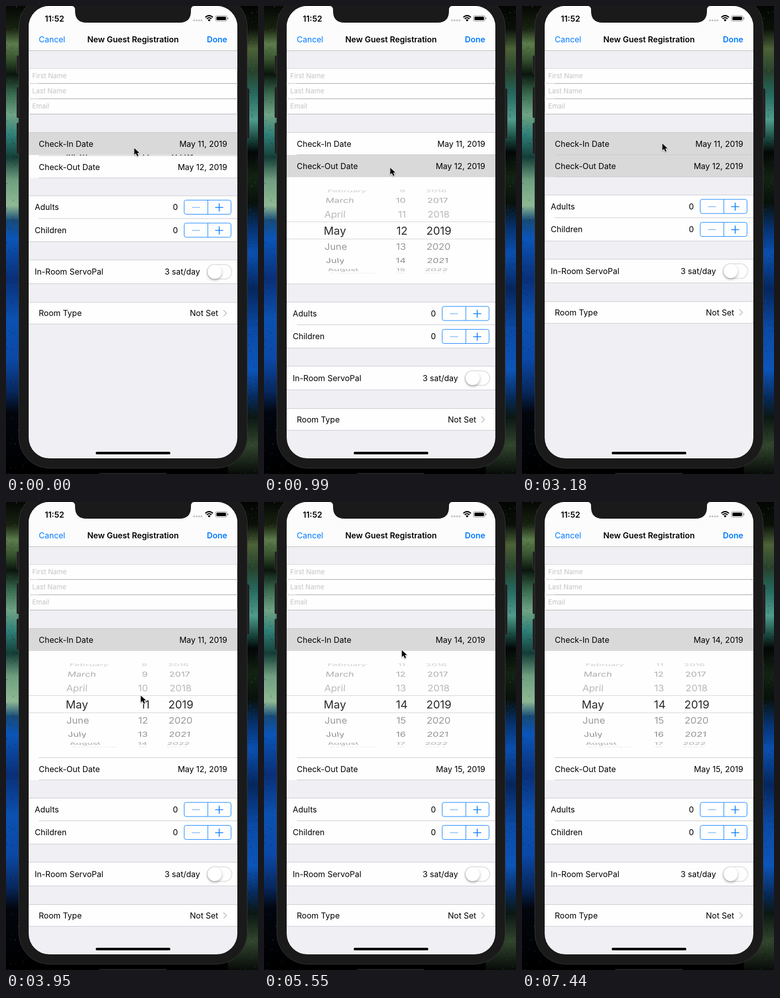
An HTML page with a canvas that plays this animation: 500x927 px, repeating every 7750 ms.

```html
<!DOCTYPE html>
<html lang="en">
<head>
<meta charset="utf-8">
<title>New Guest Registration</title>
<style>
html, body { margin: 0; width: 100%; height: 100%; overflow: hidden; background: #000; }
canvas { display: block; width: 500px; height: 927px; }
</style>
</head>
<body>
<canvas></canvas>
<script>
const W = 500, H = 927, LOOP = 7750;
const BLUE = '#007aff', LINE = '#c8c7cc', OPEN = 212;
const dpr = window.devicePixelRatio || 1;
const canvas = document.querySelector('canvas');
const makeContext = c => {
  c.width = W * dpr;
  c.height = H * dpr;
  const context = c.getContext('2d');
  context.scale(dpr, dpr);
  return context;
};
const screen = makeContext(canvas);
let g = screen;

// Drawing helpers
function rect(x, y, w, h, color) {
  g.fillStyle = color;
  g.fillRect(x, y, w, h);
}
function round(x, y, w, h, r, fill, stroke, width = 1) {
  g.beginPath();
  g.roundRect(x, y, w, h, r);
  if (fill) { g.fillStyle = fill; g.fill(); }
  if (stroke) { g.strokeStyle = stroke; g.lineWidth = width; g.stroke(); }
}
function stroke(path, color, width) {
  g.strokeStyle = color;
  g.lineWidth = width;
  g.stroke(new Path2D(path));
}
function text(s, x, y, { align = 'left', size = 16, color = '#000', weight = 400 } = {}) {
  g.font = `${weight} ${size}px Inter, sans-serif`;
  g.textAlign = align;
  g.fillStyle = color;
  g.fillText(s, x, y + size * 0.364);
}
const rule = (y, x = 45, color = LINE) => rect(x, y, 459 - x, 1, color);

// Timing helpers
const part = (t, a, b) => Math.min(1, Math.max(0, (t - a) / (b - a)));
const ease = (t, a, b) => (1 - Math.cos(Math.PI * part(t, a, b))) / 2;

const cursorPath = [
  [60, 254, 281], [150, 250, 318], [630, 250, 318], [990, 250, 320], [1460, 250, 320],
  [1800, 262, 420], [2000, 268, 405], [2230, 273, 345], [2450, 277, 310], [2690, 277, 310],
  [3040, 278, 272], [3400, 278, 272], [3950, 267, 383], [4010, 267, 383], [4480, 273, 293],
  [5500, 273, 293], [5550, 273, 293], [5790, 272, 294], [5970, 272, 294],
  [6740, 356, 615], [7440, 502, 930]
];
function cursorAt(t) {
  const i = cursorPath.findIndex(p => p[0] > t);
  if (i === 0) return cursorPath[0].slice(1);
  if (i < 0) return cursorPath.at(-1).slice(1);
  const [a, x0, y0] = cursorPath[i - 1], [b, x1, y1] = cursorPath[i];
  const e = ease(t, a, b);
  return [x0 + (x1 - x0) * e, y0 + (y1 - y0) * e];
}

// Wallpaper strips and phone body, drawn once
function paintBackdrop() {
  let seed = 7;
  const rnd = () => (seed = seed * 16807 % 2147483647) / 2147483647;
  const strip = (x, w, stops) => {
    const grad = g.createLinearGradient(0, 0, 0, H);
    stops.forEach(([y, c]) => grad.addColorStop(y / H, c));
    rect(x, 0, w, H, grad);
  };
  rect(0, 0, W, H, '#000');
  strip(0, 90, [[0, '#050805'], [45, '#18220f'], [75, '#5d7c4b'], [105, '#36522f'], [135, '#0a150c'],
    [175, '#3a6b50'], [215, '#6fa384'], [255, '#2f7f78'], [300, '#143d37'], [345, '#6f9f80'],
    [395, '#8fb994'], [425, '#164a78'], [460, '#0b55b8'], [540, '#0a2f77'], [620, '#0b51b0'],
    [700, '#0b48a6'], [765, '#08265a'], [805, '#02060d'], [927, '#000']]);
  strip(440, 60, [[0, '#030503'], [45, '#0a1008'], [85, '#4c6238'], [130, '#27412c'], [175, '#27695f'],
    [225, '#4f9c8b'], [262, '#1a4a42'], [290, '#030605'], [340, '#132313'], [390, '#07100a'],
    [440, '#06326f'], [490, '#0a4fae'], [560, '#06265c'], [640, '#0b4aa5'], [720, '#0c55b9'],
    [775, '#072a5a'], [815, '#0b1712'], [870, '#31452d'], [927, '#070b08']]);
  for (let i = 0; i < 1500; i++) {
    const x = rnd() < 0.5 ? rnd() * 48 : 452 + rnd() * 48;
    const y = rnd() * H, size = 0.5 + rnd() * 1.3;
    const color = y > 420 && y < 830 ? '40,110,200' : '125,165,110';
    rect(x, y, size, size, rnd() < 0.5 ? 'rgba(0,0,0,.4)' : `rgba(${color},${rnd() * 0.5})`);
  }
  rect(60, 905, 380, 22, '#000');
  rect(185, 925, 133, 2, '#242424');

  for (const [y, h] of [[98, 36], [160, 61], [231, 61]]) round(21.5, y + 0.5, 8, h, 2, '#1d1d1d', '#343434');
  round(474.5, 163.5, 8, 99, 2, '#1d1d1d', '#343434');
  round(25.5, -20, 453, 935.5, 61, '#1a1a1a', '#363636');
  round(28, -18, 448, 931, 59, '#1a1a1a');
}

function paintBars() {
  rect(45, 0, 414, 88, '#fcfcfd');
  rule(88, 45, '#b9b9bc');
  text('11:52', 77, 25, { weight: 600 });
  text('Cancel', 65, 66, { color: BLUE });
  text('New Guest Registration', 252, 66, { align: 'center', weight: 600 });
  text('Done', 439, 66, { align: 'right', weight: 600, color: BLUE });
  for (let i = 0; i < 4; i++) round(371 + i * 5, 26.5, 4, 4, 2, '#c6c6c8');
  g.lineCap = 'butt';
  stroke('M395.5 22.5Q403 15.5 410.5 22.5M398.2 25.4Q403 20.8 407.8 25.4', '#000', 2.2);
  g.fillStyle = '#000';
  g.fill(new Path2D('M400.2 27.6Q403 25 405.8 27.6L403 30.8Z'));
  round(415.5, 19, 23, 11, 3, null, '#8a8a8a');
  round(417.5, 21, 19, 7, 1.5, '#000');
  round(439.5, 22.5, 1.8, 4, 1, '#8a8a8a');
  g.fillStyle = '#1a1a1a';
  g.fill(new Path2D('M130 0Q137 0 137 8V10Q137 33 160 33H344Q367 33 367 10V8Q367 0 374 0Z'));
}

function paintFields() {
  rect(45, 123, 414, 92, '#fefefe');
  rule(123);
  ['First Name', 'Last Name', 'Email'].forEach((name, i) => {
    const y = 123.5 + i * 30.3;
    round(45.5, y, 413, 29.6, 5, '#fefefe', '#d4d4d4');
    text(name, 52, y + 14.5, { size: 13.4, color: '#c4c4c8' });
    if (i) rule(Math.round(y) - 1, 65, '#b4b4b8');
  });
  rule(214);
}

const months = ['January', 'February', 'March', 'April', 'May', 'June', 'July', 'August', 'September'];
const above = ['#b9b9b9', '#b9b9b9', '#adadad', '#cecece', '#e4e4e4'];
const below = ['#999', '#999', '#8f8f8f', '#a8a8a8', '#dedede'];
function paintPicker(top, height, day) {
  const mid = 252, cy = top + height / 2, step = 0.394, radius = 84.6;
  const columns = [
    { x: 119, lensX: 118.5, align: 'left', pos: 4, label: i => months[i] },
    { x: 282, lensX: 285, align: 'right', pos: day, label: i => i },
    { x: 347, lensX: 347, align: 'center', pos: 2019, label: i => i }
  ];
  const clipped = (boxes, draw) => {
    g.save();
    g.beginPath();
    boxes.forEach(b => g.rect(45, b[0], 414, b[1]));
    g.clip();
    for (const c of columns) {
      const first = Math.round(c.pos) - 4;
      for (let i = first; i < first + 9; i++) draw(c, c.label(i), i - c.pos);
    }
    g.restore();
  };
  g.save();
  g.beginPath();
  g.rect(45, top, 414, height);
  g.clip();
  clipped([[cy - 82, 65], [cy + 17, 70]], (c, label, off) => {
    const a = off * step;
    if (Math.abs(a) > 1.65) return;
    const shrink = 1 - 0.085 * (1 - Math.cos(a));
    const shear = (mid - c.x) * 0.001 * Math.sin(a);
    const tone = Math.min(4, Math.round(Math.abs(off)));
    g.save();
    g.transform(shrink, 0, shear, Math.max(0.12, Math.cos(a)),
      mid + (c.x - mid) * shrink, cy + radius * Math.sin(a));
    text(label, 0, 0, { align: c.align, size: 19.4, color: (off < 0 ? above : below)[tone] });
    g.restore();
  });
  clipped([[cy - 17, 34]], (c, label, off) =>
    text(label, c.lensX, cy + off * 34, { align: c.align, size: 22, color: '#2a2a2a' }));
  rule(Math.round(cy - 17.5), 45, '#d2d2d4');
  rule(Math.round(cy + 16.5), 45, '#d2d2d4');
  g.restore();
}

function dateRow(y, label, value, glow) {
  rect(45, y, 414, 44, '#fefefe');
  rect(45, y, 414, 44, `rgba(217,217,217,${glow})`);
  text(label, 65, y + 22, {});
  text(value, 439, y + 22, { align: 'right' });
}

function stepperRow(y, label) {
  text(label, 57, y, {});
  text('0', 341, y, { align: 'right' });
  round(353.5, y - 14, 93, 28, 4, null, BLUE);
  stroke(`M400.5 ${y - 14}v28`, BLUE, 1);
  stroke(`M369 ${y + 0.5}h16`, 'rgba(0,122,255,.5)', 1.4);
  stroke(`M415 ${y + 0.5}h16M423 ${y - 7.5}v16`, BLUE, 1.6);
}

function section(y, h) {
  rect(45, y, 414, h, '#fefefe');
  rule(y);
  rule(y + h);
}

function paintLower(shift) {
  g.save();
  g.translate(0, Math.round(shift * 2) / 2);
  section(374, 91);
  rule(419, 65);
  stepperRow(397, 'Adults');
  stepperRow(442.5, 'Children');

  section(501, 47);
  text('In-Room ServoPal', 57, 525, {});
  text('3 sat/day', 385, 525, { align: 'right' });
  round(399, 510.5, 49, 29, 14.5, '#fefefe', '#e3e3e5', 2);
  g.save();
  g.shadowColor = 'rgba(0,0,0,.3)';
  g.shadowBlur = 5 * dpr;
  g.shadowOffsetY = 2.5 * dpr;
  round(400, 511, 28, 28, 14, '#fff');
  g.restore();

  section(585, 43);
  text('Room Type', 65, 607, {});
  text('Not Set', 421, 607, { align: 'right' });
  stroke('M431.5 601l6 6-6 6', '#c7c7cc', 1.8);
  g.restore();
}

function paintCursor([x, y]) {
  g.save();
  g.translate(x, y);
  const arrow = new Path2D('M.5 .5V14L3.8 11 6.2 16.5 8.8 15.4 6.4 10H10.8Z');
  g.shadowColor = 'rgba(0,0,0,.35)';
  g.shadowBlur = 2 * dpr;
  g.shadowOffsetY = dpr;
  g.strokeStyle = '#fff';
  g.lineWidth = 2;
  g.lineJoin = 'round';
  g.stroke(arrow);
  g.shadowColor = 'transparent';
  g.fillStyle = '#000';
  g.fill(arrow);
  g.restore();
}

const backdrop = document.createElement('canvas');
g = makeContext(backdrop);
paintBackdrop();
g = screen;

function draw(t) {
  const inGap = t < 60 ? 1.7 : OPEN * ease(t, 3180, 3560);
  const outGap = OPEN * (ease(t, 630, 990) - ease(t, 2650, 3030));
  const inGlow = t < 3180 ? 1 - part(t, 630, 930) : 1;
  const outGlow = t < 630 ? 0 : 1 - part(t, 3180, 3480);
  const day = 11 + 3 * ease(t, 4010, 4560);
  const checkIn = t < 4950 ? 11 : 14;
  const outTop = 295 + inGap;

  g.drawImage(backdrop, 0, 0, W, H);
  g.save();
  g.beginPath();
  g.roundRect(45, 0, 414, 896, 41);
  g.clip();
  rect(45, 0, 414, 896, '#efeff4');
  paintBars();
  paintFields();

  rect(45, 250, 414, 89 + inGap + outGap, '#fefefe');
  dateRow(251, 'Check-In Date', `May ${checkIn}, 2019`, inGlow);
  rule(250);
  if (inGap > 0) paintPicker(294.5, inGap, day);
  dateRow(outTop, 'Check-Out Date', `May ${checkIn + 1}, 2019`, outGlow);
  if (outGap > 0 && t < 2650) paintPicker(338.5, outGap, 12);
  if (inGlow < 1 || outGlow < 1) rule(Math.round(outTop) - 1, 65);
  rule(Math.round(338 + inGap + outGap), outGap > 0 ? 45 : 65);

  paintLower(inGap + outGap);
  round(178, 883, 148, 5, 2.5, '#000');
  g.restore();
  paintCursor(cursorAt(t));
}

function tick() {
  draw(performance.now() % LOOP);
  requestAnimationFrame(tick);
}
tick();
</script>
</body>
</html>
```
